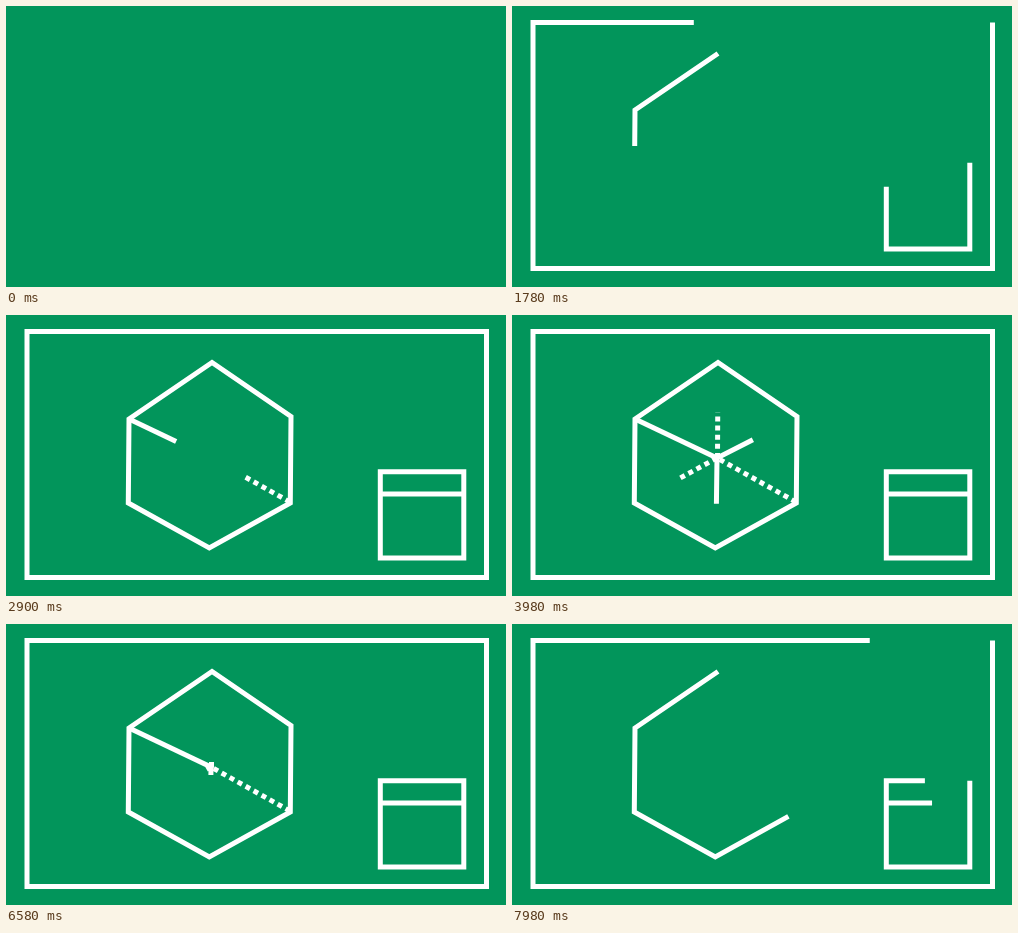
These frames come from a looping animation (500x281 px, 8 s). An HTML page:

```html
<!DOCTYPE html>
<html lang="en">
<head>
<meta charset="utf-8">
<title>Line drawing</title>
<style>
  html, body { margin: 0; width: 100%; height: 100%; overflow: hidden; background: #02955b; }
  svg { display: block; width: 100%; height: 100%; }
  path { fill: none; stroke: #fff; stroke-width: 5; stroke-miterlimit: 10; }
</style>
</head>
<body>
<svg id="stage" viewBox="0 0 500 281" preserveAspectRatio="none"></svg>
<script>
const LOOP = 8000;
const MIRROR = 10020; // the drawing is undone in reverse: t -> MIRROR - t
const DASH = '5 4.15';
const hub = [205, 143];

const strokes = [
  { pts: [[480.5, 16.5], [480.5, 262.5], [21, 262.5], [21, 16.5], [480.5, 16.5]], from: 150, to: 2219, closed: true },
  { pts: [[457.8, 156.8], [457.8, 243], [374.3, 243], [374.3, 156.8], [457.8, 156.8]], from: 826, to: 2224, closed: true },
  { pts: [[206, 47.5], [123, 104], [122.3, 188], [203.3, 233], [284.3, 188], [285, 101.5], [206, 47.5]], from: 1624, to: 2259, closed: true },
  { pts: [[374.3, 179], [457.8, 179]], from: 1810, to: 2228 },
  { pts: [[123, 104], hub], from: 2320, to: 3330 },
  { pts: [[284, 187], hub], from: 2320, to: 3330, dotted: true },
  { pts: [[203.8, 235.5], hub, [282.5, 103.5]], from: 3365, to: 4650, middle: true },
  { pts: [[205.5, 143], [206, 48]], from: 3365, to: 4640, dotted: true },
  { pts: [hub, [123, 187.5]], from: 3365, to: 4640, dotted: true }
];

const stage = document.getElementById('stage');
for (const s of strokes) {
  s.el = document.createElementNS(stage.namespaceURI, 'path');
  if (s.dotted) s.el.setAttribute('stroke-dasharray', DASH);
  stage.appendChild(s.el);
}

const mix = (p, q, k) => [p[0] + (q[0] - p[0]) * k, p[1] + (q[1] - p[1]) * k];
const dist = (p, q) => Math.hypot(q[0] - p[0], q[1] - p[1]);

// Part of a polyline between the fractions a and b of its length.
function trim(pts, a, b) {
  const total = pts.slice(1).reduce((sum, p, i) => sum + dist(pts[i], p), 0);
  const out = [];
  let done = 0;
  for (let i = 1; i < pts.length; i++) {
    const len = dist(pts[i - 1], pts[i]);
    const lo = Math.max(0, (a * total - done) / len);
    const hi = Math.min(1, (b * total - done) / len);
    if (lo < hi) {
      if (!out.length) out.push(mix(pts[i - 1], pts[i], lo));
      out.push(mix(pts[i - 1], pts[i], hi));
    }
    done += len;
  }
  return out;
}

function render(time) {
  const t = Math.min(time, MIRROR - time);
  for (const s of strokes) {
    const k = Math.max(0, Math.min(1, (t - s.from) / (s.to - s.from)));
    const part = s.middle ? trim(s.pts, 0.5 - k / 2, 0.5 + k / 2) : trim(s.pts, 0, k);
    let d = part.length ? 'M' + part.map(p => p[0].toFixed(2) + ' ' + p[1].toFixed(2)).join('L') : '';
    if (s.closed && k === 1) d += 'Z';
    s.el.setAttribute('d', d);
  }
}

const start = performance.now();
function tick() {
  render((performance.now() - start) % LOOP);
  requestAnimationFrame(tick);
}
tick();
</script>
</body>
</html>
```
